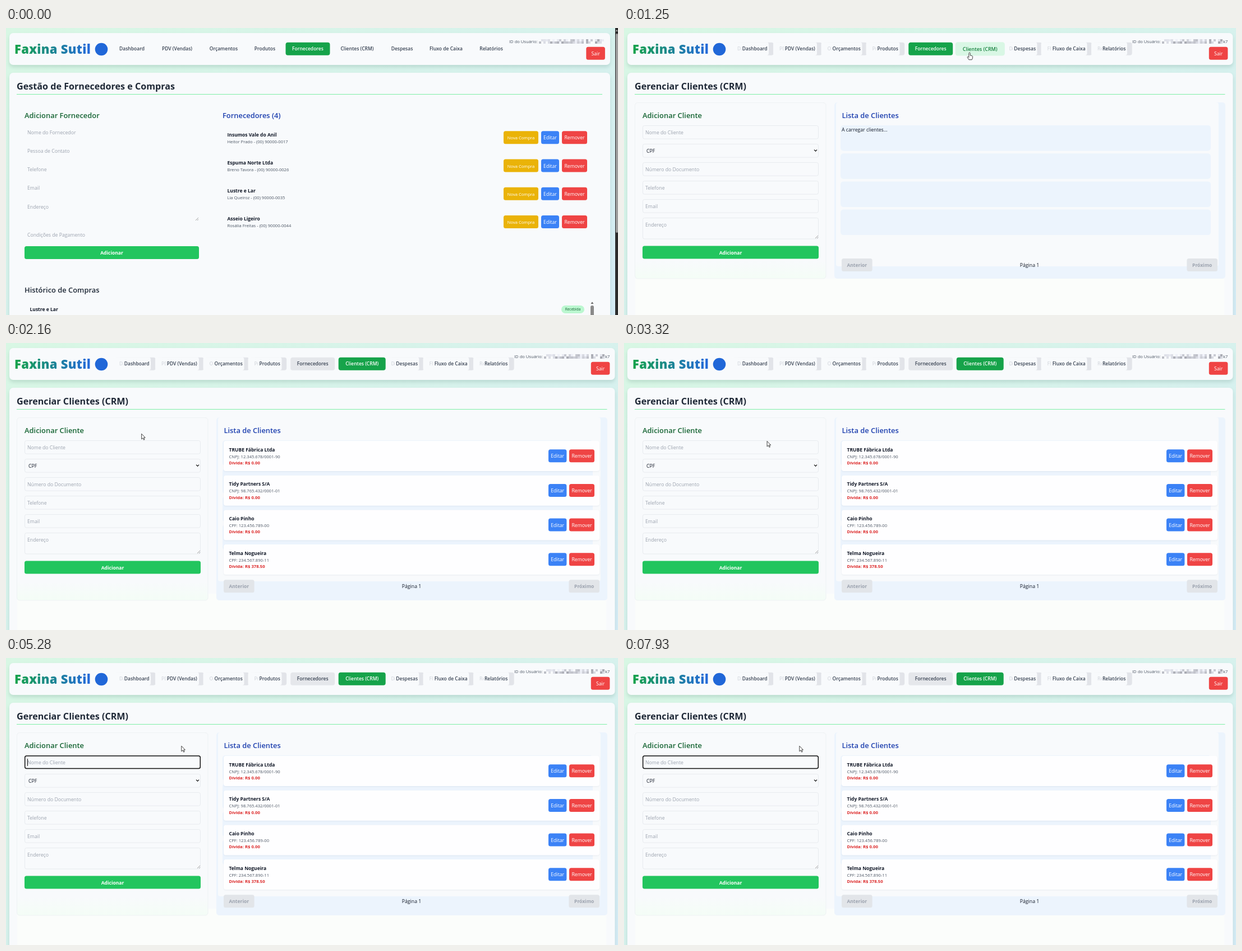
Recreate the animation shown at these times as an HTML page. Size 1091x513 px, loop 8 s.

```html
<!DOCTYPE html>
<html lang="pt-BR">
<head>
<meta charset="utf-8">
<title>Gestão de clientes</title>
<style>
html, body { margin: 0; width: 100%; height: 100%; overflow: hidden; background: #d8f6ea; }
svg { display: block; width: 1091px; height: 513px; }
text { font: 400 8.7px "Open Sans", "Noto Sans", sans-serif; fill: #111827; }
.logo { font-size: 22px; font-weight: 800; letter-spacing: .3px; }
.h1 { font-size: 16.15px; font-weight: 700; fill: #1f2937; }
.h2 { font-size: 12.9px; font-weight: 600; }
.nav { font-size: 8.5px; font-weight: 600; fill: #374151; }
.b { font-size: 8.5px; font-weight: 700; }
.hint { fill: #9ca3af; }
.sub { font-size: 7.6px; fill: #4b5563; }
.debt { font-size: 7.7px; font-weight: 700; fill: #dc2626; }
.w { fill: #fff; }
.small { font-size: 7.6px; }
.tiny { font-size: 6.5px; fill: #166534; }
.mid { text-anchor: middle; }
.card { filter: drop-shadow(0 4px 3px rgba(0, 60, 50, .13)); }
.row { filter: drop-shadow(0 1px .8px rgba(30, 50, 80, .07)); }
</style>
</head>
<body>
<svg id="stage" viewBox="0 0 1091 513" xmlns="http://www.w3.org/2000/svg"></svg>
<script>
const LOOP = 8000, STEP = 70;
const PAPER = '#f8fafc', ICE = '#ecf4fd';
const GREEN = [22, 163, 74], MINT = [217, 247, 229], GREY = [229, 231, 235],
  INK = [55, 65, 81], WHITE = [255, 255, 255], LEAF = [21, 128, 61];

const rect = (x, y, w, h, fill, r = 0, more = '') =>
  `<rect x="${x}" y="${y}" width="${w}" height="${h}" fill="${fill}" rx="${r}" ${more}/>`;
const text = (x, y, s, cls = '', more = '') => `<text x="${x}" y="${y}" class="${cls}" ${more}>${s}</text>`;
const button = (x, y, w, label, fill, cls = 'w') =>
  rect(x, y, w, 23, fill, 3.5) + text(x + w / 2, y + 15, label, 'mid ' + cls);
const ring = (id, x, y, w, h) =>
  rect(x, y, w, h, 'none', 3, `id="${id}" stroke="#111" stroke-width="1.5" visibility="hidden"`);
const grip = (x, y) => `<path d="M${x} ${y}l5-5m-2 5l2-2" stroke="#777" stroke-width=".7"/>`;

// label, pill centre, pill width
const NAV = [
  ['Dashboard', 224.5, 67], ['PDV (Vendas)', 305, 78], ['Orçamentos', 388, 73],
  ['Produtos', 461.5, 60], ['Fornecedores', 538, 79], ['Clientes (CRM)', 626, 84],
  ['Despesas', 706, 61], ['Fluxo de Caixa', 784.5, 82], ['Relatórios', 865, 64]
];
const SHIFT = 8.7;

const SUPPLIERS = [
  ['Insumos Vale do Anil', 'Heitor Prado - (00) 90000-0017'],
  ['Espuma Norte Ltda', 'Breno Tavora - (00) 90000-0026'],
  ['Lustre e Lar', 'Lia Queiroz - (00) 90000-0035'],
  ['Asseio Ligeiro', 'Rosália Freitas - (00) 90000-0044']
];
const CLIENTS = [
  ['TRUBE Fábrica Ltda', 'CNPJ: 12.345.678/0001-90', '0.00'],
  ['Tidy Partners S/A', 'CNPJ: 98.765.432/0001-01', '0.00'],
  ['Caio Pinho', 'CPF: 123.456.789-00', '0.00'],
  ['Telma Nogueira', 'CPF: 234.567.890-11', '378.50']
];

function mosaic(x0, x1) {
  let seed = 7, out = '';
  const rnd = () => (seed = seed * 16807 % 2147483647) / 2147483647;
  for (let x = x0; x < x1; x += 4)
    for (let y = 20; y < 28; y += 4) {
      const v = 165 + rnd() * 80 | 0;
      if (rnd() < .7) out += rect(x, y, 4, 4, `rgb(${v},${v + 2},${v + 10})`);
    }
  return out;
}

function header(right, idX, tail) {
  return rect(6, 9, right - 6, 57, PAPER, 7, 'class="card"') +
    text(15, 46, 'Faxina Sutil', 'logo', 'style="fill:url(#brand)"') +
    '<circle cx="170" cy="38" r="11.3" fill="#2067d8"/>' +
    text(idX, 26.5, 'ID do Usuário:', 'sub') + mosaic(idX + 53, 1066) + tail +
    button(right - 42.7, 33.8, 33.6, 'Sair', '#ef4444');
}

function pill(name, cx, w, id) {
  return `<g id="${id}">` + rect(cx - w / 2, 25.8, w, 23, 'none', 4) +
    text(cx, 40.4, name, 'nav mid') + '</g>';
}

// what is left of a menu entry's earlier place
function pillTrace(name, c, w) {
  const x = c - w / 2;
  return rect(x + SHIFT, 25.8, w, 23, '#e2e4e9', 4) + rect(x, 25.6, w, 23.4, PAPER, 4) +
    text(x + 11, 40.4, name.slice(0, 2), 'nav', 'style="fill:#d9dce2"') +
    rect(x + SHIFT + 10, 31, w - 21, 13, PAPER);
}

function card(right, title) {
  return rect(6, 80, right - 6, 450, PAPER, 7, 'class="card"') +
    text(19, 110, title, 'h1') + rect(19, 118, right - 33, 1.1, '#86efac');
}

function suppliersPage() {
  let s = header(1077, 897, '') + card(1077, 'Gestão de Fornecedores e Compras');
  NAV.forEach(([n, c, w], i) => s += pill(n, c, w, 'a' + i));
  s += text(33, 161.3, 'Adicionar Fornecedor', 'h2', 'style="fill:#166534"') +
    text(386, 161.3, 'Fornecedores (4)', 'h2', 'style="fill:#1e40af"');
  ['Nome do Fornecedor', 'Pessoa de Contato', 'Telefone', 'Email', 'Endereço']
    .forEach((f, i) => s += text(38, 189.7 + i * 33.2, f, 'hint'));
  s += text(38, 372.6, 'Condições de Pagamento', 'hint') + grip(338, 344) +
    button(33, 390, 311, 'Adicionar', '#22c55e', 'w b');
  SUPPLIERS.forEach(([name, contact], i) => {
    const y = i * 50.2;
    s += text(394.5, y + 193.6, name, 'b') + text(394.5, y + 205.6, contact, 'sub') +
      button(887, y + 184.3, 62, 'Nova Compra', '#eab308', 'w small') +
      button(954, y + 184.3, 32, 'Editar', '#3b82f6') +
      button(991, y + 184.3, 45, 'Remover', '#ef4444');
  });
  return s + text(33, 473.2, 'Histórico de Compras', 'h2', 'style="fill:#1f2937"') +
    text(42.5, 505.8, SUPPLIERS[2][0], 'b') + text(42.5, 517.5, 'Data: 15/10/2025', 'sub') +
    rect(990, 496, 41, 14, '#bbf7d0', 7) + text(1010.5, 505.3, 'Recebida', 'tiny mid') +
    '<path d="M1042.5 493l2.5-3.5 2.5 3.5z" fill="#666"/>' + rect(1042, 496, 6, 30, '#8a8a8a', 3) +
    rect(1086, 0, 5, 513, '#2c2c2c') + rect(1087, 10, 4, 356, '#9f9f9f', 2) +
    '<path d="M1086.5 6l2.2-3 2.2 3z" fill="#aaa"/>';
}

function pager(y) {
  return button(388, y, 54.6, 'Anterior', '#e2e5e9', 'b hint') + text(723, y + 15, 'Página 1', 'mid') +
    button(1003.4, y, 54.6, 'Próximo', '#e2e5e9', 'b hint');
}

function panels(bottom) {
  let s = rect(19.5, 133.5, 340.5, bottom - 133.5, 'url(#leftPanel)', 5, 'stroke="#eef2f4"') +
    rect(375, 133, 697, bottom - 133, ICE, 5) + rect(378, 133, 682, 293, PAPER, 4);
  for (let i = 0; i < 4; i++) s += rect(386, 174 + i * 50.2, 660, 45.5, ICE, 5);
  return s;
}

function clientsPage() {
  let s = header(1085.5, 906, text(1068, 26.5, 'k7', 'sub')) + card(1085.5, 'Gerenciar Clientes (CRM)') +
    rect(20, 448, 1050, 65, '#fbfdfb');
  NAV.forEach(([n, c, w], i) => { if (i !== 4 && i !== 5) s += pillTrace(n, c, w); });
  NAV.forEach(([n, c, w], i) => {
    const cx = c + SHIFT;
    s += pill(n, cx, w, 'b' + i) + ring('ring' + i, cx - w / 2, 26, w, 22.6);
  });
  s += ring('ringExit', 1042.8, 33.8, 33.6, 23);

  s += '<g id="loading">' + panels(448) + text(388, 184.6, 'A carregar clientes...') + pager(412) + '</g>';

  s += '<g id="loaded">' + panels(460);
  CLIENTS.forEach(([name, doc, debt], i) => {
    const y = i * 61.7;
    s += rect(388, y + 175, 670, 54, '#fefeff', 4, 'class="row"') +
      text(397.5, y + 193.5, name, 'b') + text(397.5, y + 205.6, doc, 'sub') +
      text(397.5, y + 217, 'Dívida: R$ ' + debt, 'debt') +
      button(967, y + 190.2, 32.4, 'Editar', '#3b82f6') +
      button(1004, y + 190.2, 45, 'Remover', '#ef4444');
  });
  s += pager(423.3) + '</g>';

  s += text(33, 161.3, 'Adicionar Cliente', 'h2', 'style="fill:#166534"') +
    text(388.5, 161.3, 'Lista de Clientes', 'h2', 'style="fill:#1e40af"');
  ['Nome do Cliente', 'CPF', 'Número do Documento', 'Telefone', 'Email', 'Endereço'].forEach((f, i) => {
    const y = 174.5 + i * 33;
    s += rect(33.5, y, 313, i === 5 ? 37.5 : 23.6, PAPER, 3, 'stroke="#e8ebef"') +
      text(i === 1 ? 40 : 38, y + 15.2, f, i === 1 ? '' : 'hint');
  });
  return s + '<path d="M339 217.6l2.5 2.5 2.5-2.5" fill="none" stroke="#111" stroke-width="1.3"/>' +
    grip(341, 376) + button(33, 389.6, 314, 'Adicionar', '#22c55e', 'w b') +
    ring('ringName', 33.7, 174.9, 312.6, 22.6) + rect(38, 180, 1, 13, '#111', 0, 'id="caret"');
}

const gradient = (id, attrs, a, b, from = 0) =>
  `<linearGradient id="${id}" ${attrs}><stop offset="${from}" stop-color="${a}"/><stop offset="1" stop-color="${b}"/></linearGradient>`;

document.getElementById('stage').innerHTML = '<defs>' +
  gradient('page', 'x2="1" y2="1"', '#d8f7e4', '#d5ecf6') +
  gradient('brand', 'gradientUnits="userSpaceOnUse" x1="15" x2="165"', '#16a34a', '#2563eb') +
  gradient('leftPanel', 'x2="0" y2="1"', PAPER, '#f4fdf6', .9) + '</defs>' +
  rect(0, 0, 1091, 513, 'url(#page)') +
  `<g id="suppliers">${suppliersPage()}</g><g id="clients">${clientsPage()}</g>` +
  `<g id="cursor" stroke="#222" stroke-width=".85" fill="#fff" stroke-linejoin="round">
    <path id="arrow" d="M0 0V9.6L2.3 7.5L3.9 10.9L5.4 10.2L3.9 6.9H6.6Z"/>
    <path id="hand" d="M0 0c.9 0 1.2.6 1.2 1.3V5l3 .7c1 .2 1.5.8 1.4 1.8l-.5 3.2-1 2H-1.2l-2.6-4.2c-.5-.9.6-1.7 1.4-1l1.2 1.1V1.3C-1.2.6-.9 0 0 0Z"/></g>`;

// time, x, y of the pointer tip
const PATH = [
  [260, 960, 471], [540, 842, 396], [750, 624, 166], [890, 616, 62], [1030, 616, 44],
  [1600, 616, 44], [1740, 455, 72], [1880, 320, 108], [2020, 263, 140], [2160, 240, 164],
  [2370, 225.5, 172], [2900, 225.5, 173], [2970, 236.5, 169.5], [3110, 236.5, 169.5],
  [3390, 269, 180], [3590, 271, 179], [3730, 288, 172], [3930, 296, 167],
  [4270, 309.8, 159.5], [4480, 312.8, 157.3], [LOOP, 312.8, 157.3]
];
// element, start, end of keyboard focus
const FOCUS = [
  ['ring6', 3660, 3930], ['ring7', 3930, 4070], ['ring8', 4070, 4200],
  ['ringExit', 4200, 4480], ['ringName', 4480, LOOP]
];

const $ = id => document.getElementById(id);
const show = (id, on) => $(id).setAttribute('visibility', on ? 'inherit' : 'hidden');
const lerp = (a, b, p) => a + (b - a) * p;
const mix = (a, b, p) => `rgb(${a.map((v, i) => Math.round(lerp(v, b[i], p)))})`;
const rgb = c => `rgb(${c})`;

function paint(id, fill, ink, scale = 1) {
  const g = $(id), box = g.firstChild;
  const cx = +box.getAttribute('x') + box.getAttribute('width') / 2;
  box.setAttribute('fill', fill);
  g.lastChild.style.fill = ink;
  g.setAttribute('transform', `translate(${cx} 37.3) scale(${scale}) translate(${-cx} -37.3)`);
}

function pointerAt(t) {
  const i = Math.max(1, PATH.findIndex(k => k[0] > t));
  const [a, b] = [PATH[i - 1], PATH[i]];
  const p = (t - a[0]) / (b[0] - a[0]);
  return [lerp(a[1], b[1], p), lerp(a[2], b[2], p)];
}

function draw(t) {
  const q = Math.max(0, Math.floor((t - 50) / STEP) * STEP + 50);
  const onClients = t >= 1110, loaded = t >= 1320, pointing = t >= 260;
  const hover = q >= 960 && q < 1650, grow = hover ? 1.05 : 1;
  show('suppliers', !onClients);
  show('clients', onClients);
  show('loading', true);
  if (!onClients || loaded) show('loading', false);
  show('loaded', false);
  if (onClients && loaded) show('loaded', true);

  paint('a4', rgb(GREEN), rgb(WHITE));
  paint('a5', hover ? rgb(MINT) : 'none', rgb(hover ? LEAF : INK), grow);
  const p = Math.min(1, Math.max(0, (q - 1240) / 150));
  paint('b4', mix(GREEN, GREY, p), mix(WHITE, INK, p));
  paint('b5', mix(MINT, GREEN, p), mix(LEAF, WHITE, p), grow);

  FOCUS.forEach(([id, from, to]) => show(id, t >= from && t < to));
  show('caret', t >= 5280 && Math.floor((t - 5280) / 530) % 2 === 0);

  show('arrow', pointing && !hover);
  show('hand', pointing && hover);
  const [x, y] = pointerAt(Math.max(260, q));
  $('cursor').setAttribute('transform', `translate(${x} ${y})`);
}

const start = performance.now();
(function tick() {
  draw((performance.now() - start) % LOOP);
  requestAnimationFrame(tick);
})();
</script>
</body>
</html>
```
